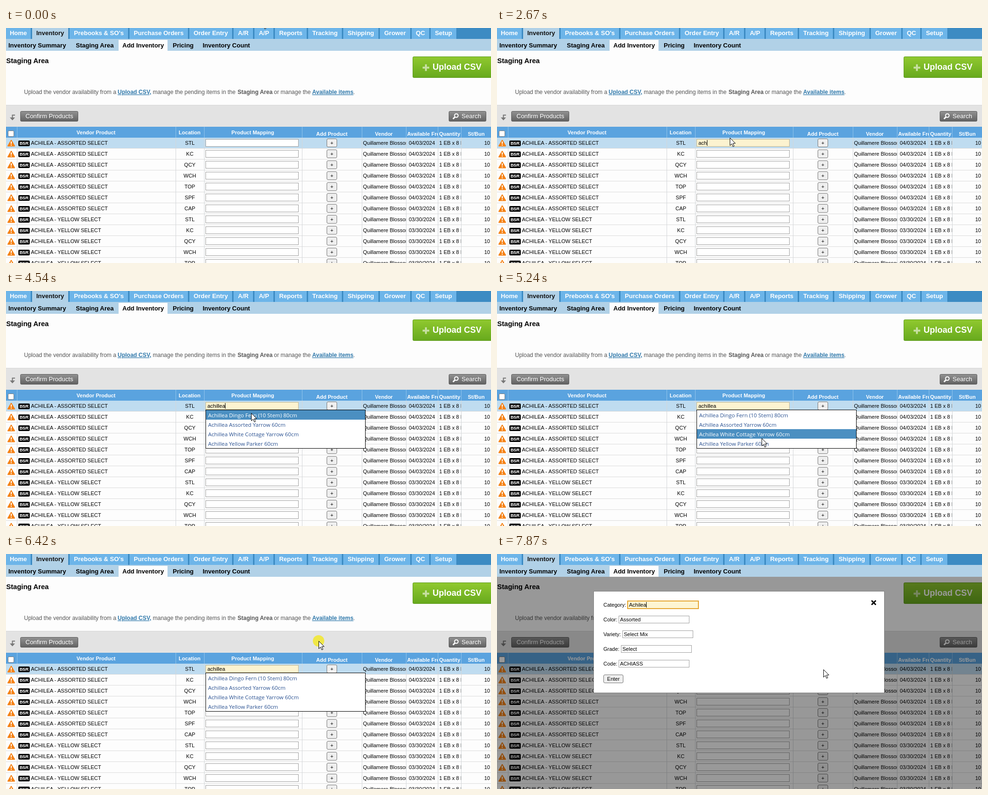
An HTML page that plays this animation: 1021x495 px, repeating every 8000 ms.

```html
<!DOCTYPE html>
<html lang="en">
<head>
<meta charset="utf-8">
<title>Staging Area</title>
<style>
  html, body { margin: 0; width: 100%; height: 100%; overflow: hidden; background: #fdfdfd; }
  svg { display: block; }
  text { font-family: "Liberation Sans", Arial, sans-serif; font-size: 11px; white-space: pre; }
  .b { font-weight: bold; }
  .m { text-anchor: middle; }
  .w { fill: #fff; }
  .s13 { font-size: 13px; }
  .s12 { font-size: 12px; fill: #555; }
  .link { fill: #3079ab; text-decoration: underline; }
  .item { font-family: "Open Sans", "Noto Sans", sans-serif; font-size: 11.42px; fill: #2b5292; }
  .item.on { fill: #fff; }
</style>
</head>
<body>
<svg id="stage" width="1021" height="495" viewBox="0 0 1021 495">
  <defs>
    <linearGradient id="green" x2="0" y2="1"><stop stop-color="#90c92f"/><stop offset="1" stop-color="#67a91d"/></linearGradient>
    <linearGradient id="grey" x2="0" y2="1"><stop stop-color="#929292"/><stop offset="1" stop-color="#626262"/></linearGradient>
  </defs>
</svg>
<script>
const LOOP = 8000;
const stage = document.getElementById('stage');
const $ = id => document.getElementById(id);
const show = (id, on) => $(id).setAttribute('display', on ? 'inline' : 'none');

// Markup helpers
const rect = (x, y, w, h, fill, extra = '') =>
  `<rect x="${x}" y="${y}" width="${w}" height="${h}" fill="${fill}" ${extra}/>`;
const box = (x, y, w, h, fill, stroke, extra = '') =>
  rect(x + .5, y + .5, w - 1, h - 1, fill, `stroke="${stroke}" ${extra}`);
const text = (x, y, s, cls = '', extra = '') =>
  `<text x="${x}" y="${y}" class="${cls}" ${extra}>${s}</text>`;
const path = (d, extra) => `<path d="${d}" ${extra}/>`;
const clipped = (x, y, w, h, body) =>
  `<svg x="${x}" y="${y}" width="${w}" height="${h}" viewBox="${x} ${y} ${w} ${h}">${body}</svg>`;
const group = (id, body) => `<g id="${id}">${body}</g>`;
const button = (x, y, w, h, label) =>
  box(x, y, w, h, '#efefef', '#767676', 'rx="2.5"') + text(x + w / 2, y + 13, label, 'm');

const TABS = [['Home', 0, 52], ['Inventory', 55, 76], ['Prebooks &amp; SO\'s', 134, 123],
  ['Purchase Orders', 260, 123], ['Order Entry', 386, 90], ['A/R', 479, 41], ['A/P', 523, 40],
  ['Reports', 566, 67], ['Tracking', 636, 71], ['Shipping', 710, 74], ['Grower', 787, 64],
  ['QC', 854, 37], ['Setup', 894, 54]];
const SUBTABS = [['Inventory Summary', 5], ['Staging Area', 147], ['Add Inventory', 245],
  ['Pricing', 351], ['Inventory Count', 414]];
const EDGES = [23, 357, 417, 623, 749, 842, 909, 958];
const LOCATIONS = ['STL', 'KC', 'QCY', 'WCH', 'TOP', 'SPF', 'CAP'];
const ITEMS = ['Achillea Dingo Fern (10 Stem) 80cm', 'Achillea Assorted Yarrow 60cm',
  'Achillea White Cottage Yarrow 60cm', 'Achillea Yellow Parker 60cm',
  'Carnation Bicolor White/Pink Komachi Fancy', 'Carnation Bicolor White/Pink Komachi Select',
  'Carnation Bicolor Yellow/Pink Fiesta Komachi Select',
  'Carnation Bicolor Yellow/Pink Fiesta Komachi Standard'];
const FIELDS = [['Category:', 'Achilea', 275], ['Color:', 'Assorted', 256],
  ['Variety:', 'Select Mix', 264], ['Grade:', 'Select', 261], ['Code:', 'ACHIASS', 256]];

function navigation() {
  return rect(0, 0, 1021, 24, '#3c8bc3') +
    TABS.map(([label, x, w], i) => rect(x, 0, w, i === 1 ? 24 : 23, i === 1 ? '#b1d1e7' : '#6db5e9') +
      text(x + w / 2, 15, label, 'b m s13', `fill="${i === 1 ? '#111' : '#fff'}"`)).join('') +
    rect(0, 23, 1021, 25, '#b1d1e7') + rect(237, 25, 103, 23, '#fdfdfd') +
    SUBTABS.map(([label, x]) => text(x, 41, label, 'b s13')).join('');
}

function toolbar() {
  return text(0.5, 74, 'Staging Area', 'b', 'style="font-size:14.6px"') +
    box(856, 60, 170, 45, 'url(#green)', '#5c9a1c', 'rx="2"') +
    path('M877 83.5h14M884 76.5v14', 'stroke="#c6dfa0" stroke-width="4"') +
    text(898, 88, 'Upload CSV', 'b w', 'style="font-size:18px"') +
    text(38, 139, 'Upload the vendor availability from a', 's12') +
    text(235, 139, 'Upload CSV,', 'b s12 link') +
    text(309, 139, 'manage the pending items in the', 's12') +
    text(487.5, 139, 'Staging Area', 'b s12') +
    text(564, 139, 'or manage the', 's12') +
    text(644.5, 139, 'Available items', 'b s12 link') + text(731, 139, '.', 's12') +
    rect(0, 162, 1021, 46, '#e3e3e3') + rect(0, 162, 1021, 1, '#d6d6d6') +
    path('M19 183.5h-5.5v6', 'fill="none" stroke="#777" stroke-width="2"') +
    path('M8 188.5h11l-5.5 6z', 'fill="#777"') +
    box(30, 175, 122, 22, 'url(#grey)', '#5a5a5a', 'rx="2"') +
    text(41, 190, 'Confirm Products', 'w s13') +
    box(932, 175, 79, 22, 'url(#grey)', '#5a5a5a', 'rx="2"') +
    '<circle cx="948" cy="184.500" r="3.800" fill="none" stroke="#fff" stroke-width="2"/>' +
    path('M945 187.500l-4 4', 'stroke="#fff" stroke-width="3"') +
    text(959, 190, 'Search', 'w s13');
}

function header() {
  const title = (x, y, s) => text(x, y, s, 'b m w');
  return rect(0, 208, 1021, 23, '#5aa3df') + rect(0, 0, 0, 23, '#4a91cb', 'id="hover"') +
    EDGES.map(x => rect(x, 208, 1, 23, '#8fc3ec')).join('') +
    box(4, 216, 13, 13, '#fff', '#767676', 'rx="2"') +
    title(189.5, 224, 'Vendor Product') + title(386.5, 224, 'Location') +
    title(519.5, 224, 'Product Mapping') + title(686, 227, 'Add Product') +
    title(795.5, 227, 'Vendor') + title(934, 227, 'Quantity') + title(990, 227, 'St/Bun') +
    clipped(843, 208, 66, 23, text(844.5, 227, 'Available From', 'b w'));
}

function row(i) {
  const y = 231 + 23 * i, base = y + 15, early = i < 7;
  return rect(0, y, 1021, 22, i ? '#fdfdfd' : '#bfdcf0') + rect(0, y + 22, 1021, 1, '#dcdcdc') +
    EDGES.map(x => rect(x, y, 1, 23, '#d3d7da')).join('') +
    path(`M11 ${y + 5.5}l7 12h-14z`, 'fill="#f58216" stroke="#f58216" stroke-width="2" stroke-linejoin="round"') +
    path(`M11 ${y + 8}v5M11 ${y + 14.5}v2`, 'stroke="#fff" stroke-width="2"') +
    rect(26, y + 6, 24, 12, '#000', 'rx="2"') +
    text(38, y + 15.3, 'B5R', 'b m w', 'style="font-size:9.5px"') +
    text(52.5, base, `ACHILEA - ${early ? 'ASSORTED' : 'YELLOW'} SELECT`) +
    text(387, base, LOCATIONS[i % 7], 'm') +
    box(420, y + 3, 196, 16, '#fff', '#a0a0a0', i ? '' : 'id="input"') +
    button(675, y + 2, 22, 18, '+') +
    clipped(750, y, 92, 22, text(751.5, base, 'Quillamere Blossoms')) +
    text(848, base, early ? '04/03/2024' : '03/30/2024') +
    clipped(910, y, 48, 22, text(912, base, '1 EB x 8 Bunch')) +
    text(1019, base, '10', '', 'text-anchor="end"');
}

function dropdown() {
  return box(420, 250, 337, 162, '#fff', '#000', 'id="frame"') +
    rect(421, 0, 335, 20, '#4b8fc1', 'id="pick"') +
    ITEMS.map((s, i) => text(425.5, 266 + 20 * i, s, 'item', `id="item${i}"`)).join('');
}

function spinner() {
  let spokes = '';
  for (let i = 0; i < 12; i++)
    spokes += path('M3.500 0H8', `transform="rotate(${i * 30})" stroke="${i < 7 ? '#111' : '#aaa'}" stroke-width="1.600" opacity="${i < 7 ? 1 - i * .1 : .6}"`);
  return clipped(599, 235, 16, 14, `<g transform="translate(607 244)"><g id="spin">${spokes}</g></g>`);
}

function dialog() {
  return rect(0, 48, 1021, 447, '#000', 'opacity=".4"') +
    box(203, 78, 613, 215, '#fff', '#808080') +
    path('M788.5 98l9 9m0-9l-9 9', 'stroke="#000" stroke-width="2.800"') +
    FIELDS.map(([label, value, x], i) => {
      const y = 99 + 31 * i;
      return text(224, y + 12, label) +
        (i ? box(x, y, 149, 16, '#fff', '#a0a0a0')
           : rect(275, 99, 149, 16, '#fdf5d3', 'stroke="#e5a735" stroke-width="2"')) +
        text(x + 3, y + 12, value);
    }).join('') +
    rect(314, 101, 1, 12, '#000') + button(224, 254, 42, 18, 'Enter');
}

stage.innerHTML += navigation() + toolbar() + header() +
  Array.from({ length: 12 }, (_, i) => row(i)).join('') +
  text(424, 246, '', '', 'id="typed"') + rect(424, 236, 1, 12, '#000', 'id="caret"') +
  group('loading', spinner()) + group('list', dropdown()) + group('modal', dialog()) +
  group('cursor',
    '<circle id="click" r="12" fill="#f2e72c" opacity=".85"/>' +
    path('M.5 .5v16l3.700-3.500 2.600 5.900 2.500-1.100-2.600-5.800h5.100z', 'id="arrow" fill="#fff" stroke="#000"') +
    path('M-3-7.500h2l1 1 1-1h2M-3 7.500h2l1-1 1 1h2M0-6.500v13', 'id="beam" transform="translate(.5 .5)" fill="none" stroke="#000"'));

// Cursor stops: time, x, y
const MOVES = [[910, 538, -17], [1540, 498, 239], [1879, 498, 239], [1880, 490, 231],
  [4200, 490, 231], [4600, 520, 262], [5030, 552, 297], [5240, 557, 310], [5520, 562, 297],
  [5880, 568, 311], [6020, 600, 420], [6090, 612, 467], [6220, 636, 330], [6350, 657, 200],
  [6420, 658, 183], [6700, 658, 183], [7470, 687, 243]];
const KEYS = [2270, 2470, 2670, 2740, 2940, 3080, 3140, 3280];
const FOCUS = 1810, BLUR = 6490;

function cursorAt(t) {
  const next = MOVES.findIndex(m => m[0] > t);
  if (next < 1) return (next ? MOVES[MOVES.length - 1] : MOVES[0]).slice(1);
  const [t0, x0, y0] = MOVES[next - 1], [t1, x1, y1] = MOVES[next];
  let k = (t - t0) / (t1 - t0);
  if (t1 - t0 > 600) k = k * k * (3 - 2 * k);
  return [Math.round(x0 + (x1 - x0) * k), Math.round(y0 + (y1 - y0) * k)];
}

function render(t) {
  const [x, y] = cursorAt(t);
  const count = KEYS.filter(k => k <= t).length;
  const focused = t >= FOCUS && t < BLUR;
  const open = t >= 3140 && t < 6690;
  const rows = t < 3610 ? 8 : 4;
  const overList = open && x > 420 && x < 757 && y > 250 && y < 251 + rows * 20;
  const picked = overList && t > 4200 ? Math.floor((y - 251) / 20) : -1;
  const overInput = !overList && x > 420 && x < 616 && y >= 234 && (y - 234) % 23 < 16;

  $('typed').textContent = 'achillea'.slice(0, count);
  $('input').setAttribute('fill', focused ? '#fcf3d0' : '#fff');
  $('input').setAttribute('stroke', focused ? '#c9b98c' : '#a0a0a0');

  const lastKey = count ? KEYS[count - 1] : FOCUS;
  show('caret', focused && Math.floor((t - lastKey) / 530) % 2 === 0);
  $('caret').setAttribute('x', Math.round(424 + (count ? $('typed').getComputedTextLength() : 0)));

  show('loading', t >= 2940 && t < 3140 || t >= 3480 && t < 3610);
  $('spin').setAttribute('transform', `rotate(${Math.floor((t - 3480) / 70) * 30 + 30})`);

  show('list', open);
  $('frame').setAttribute('height', rows * 20 + 1);
  show('pick', picked >= 0);
  $('pick').setAttribute('y', 251 + picked * 20);
  ITEMS.forEach((_, i) => {
    show('item' + i, i < rows);
    $('item' + i).classList.toggle('on', i === picked);
  });

  const edge = EDGES.findIndex(e => e > x);
  const hot = y >= 208 && y < 231 && edge > 0;
  show('hover', hot);
  if (hot) {
    $('hover').setAttribute('x', EDGES[edge - 1]);
    $('hover').setAttribute('y', 208);
    $('hover').setAttribute('width', EDGES[edge] - EDGES[edge - 1]);
  }

  show('modal', t >= 7870);
  $('cursor').setAttribute('transform', `translate(${x} ${y})`);
  show('click', [FOCUS, 6420, 7730].some(c => t >= c && t < c + 70));
  show('arrow', !overInput);
  show('beam', overInput);
}

function tick() {
  render(performance.now() % LOOP);
  requestAnimationFrame(tick);
}
tick();
</script>
</body>
</html>
```
